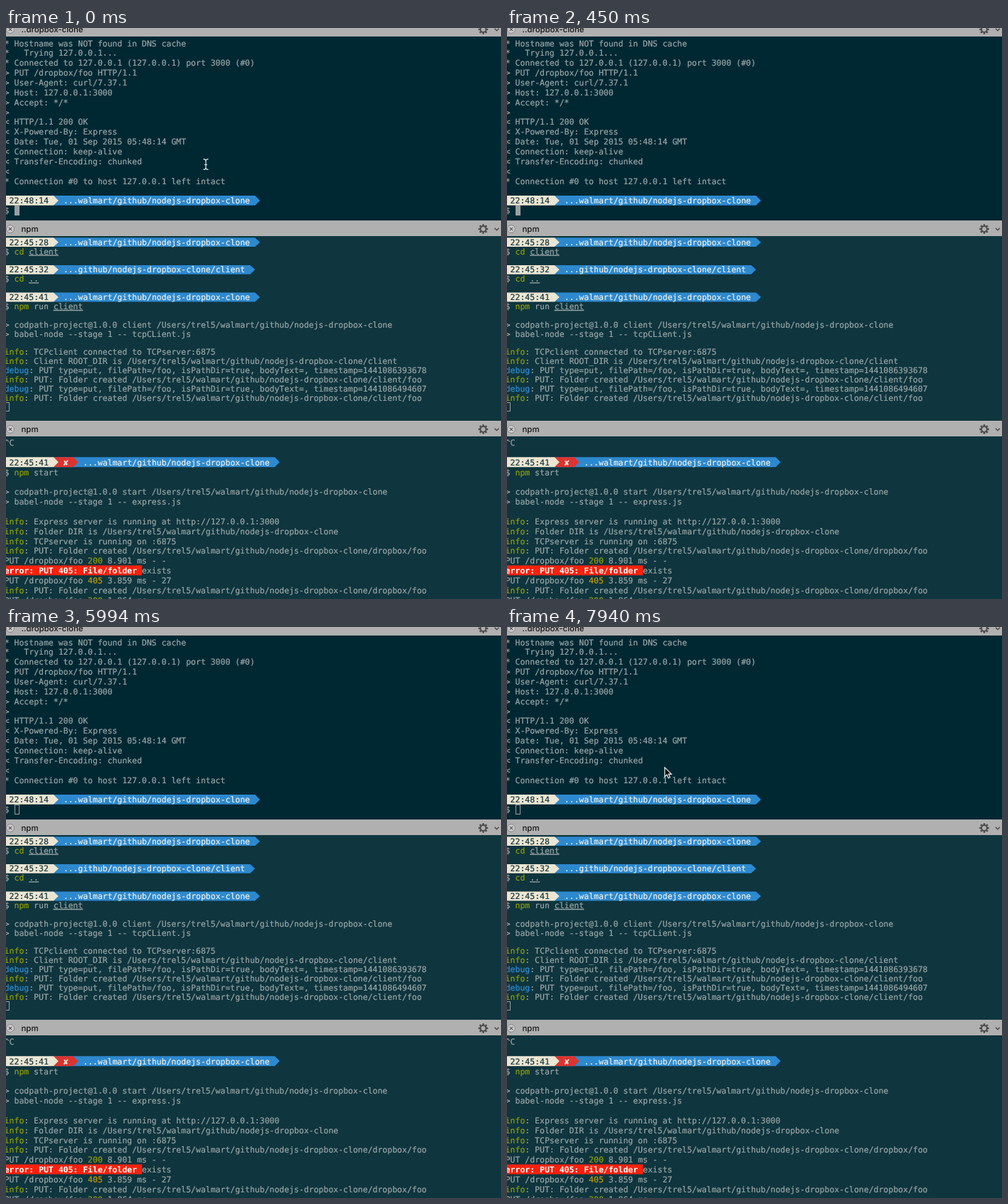
An HTML page for the animation above (8 s loop, 696 by 804 pixels).

```html
<!DOCTYPE html>
<html lang="en">
<head>
<meta charset="utf-8">
<title>Terminal panes</title>
<style>
html, body { margin: 0; width: 100%; height: 100%; overflow: hidden; background: #0f353e; }
svg { display: block; width: 696px; height: 804px; }
text { white-space: pre; text-rendering: geometricPrecision; }
.mono { font: 11.48px "DejaVu Sans Mono", monospace; color: #9aa6a6; }
.mono, .mono tspan { fill: currentColor; stroke: currentColor; stroke-width: 0.2; }
.title { font: 500 11.4px Inter, sans-serif; fill: #161616; }
.mono .g { color: #919f08; }
.mono .b { color: #2e8fd4; }
.mono .y { color: #c29d08; }
.mono .u { text-decoration: underline; }
.mono .e { color: #fff; font-weight: bold; stroke: none; }
.mono.time { color: #17343b; }
.mono.path { color: #eef0e6; }
</style>
</head>
<body>
<svg id="stage" viewBox="0 0 696 804"></svg>
<script>
const LOOP = 8000;
const COL = 6.911, LEFT = -2.3;
const ASCENT = 0.82; // share of a cell above the baseline
const GREY = '#95a1a1', CREAM = '#ebe6d3', BLUE = '#2d89cf', RED = '#dc3430';
const HOME = '/Users/trel5/walmart/github/nodejs-dropbox-clone';
const REPO = '...walmart/github/nodejs-dropbox-clone';
const stage = document.getElementById('stage');

const colX = n => LEFT + n * COL;
const escape = s => s.replace(/&/g, '&amp;').replace(/</g, '&lt;');
// {g:word} colours a word with class g
const markup = s => escape(s).replace(/\{(\w):([^}]*)\}/g, '<tspan class="$1">$2</tspan>');
const rect = (x, y, w, h, fill) => `<rect x="${x}" y="${y}" width="${w}" height="${h}" fill="${fill}"/>`;
const text = (col, y, s, cls = '') => `<text class="mono ${cls}" x="${colX(col)}" y="${y}">${markup(s)}</text>`;

// Bar that ends in an arrow head one column wide
function ribbon(from, to, top, h, fill) {
  const a = colX(from), b = colX(to), c = colX(to + 1);
  return `<path d="M${a} ${top}H${b}L${c} ${top + h / 2}L${b} ${top + h}H${a}Z" fill="${fill}"/>`;
}

function prompt(y, top, h, { time, path, failed }) {
  const start = failed ? 16 : 12, end = start + path.length + 1;
  return ribbon(10, end, top, h, BLUE)
    + (failed ? ribbon(10, 14, top, h, RED) + text(12, y, '✘', 'path') : '')
    + ribbon(0, 10, top, h, CREAM)
    + text(1, y, time, 'time') + text(start, y, path, 'path');
}

function rows(y0, pitch, lines) {
  return lines.map((line, i) => {
    const y = y0 + i * pitch, top = y - ASCENT * pitch;
    if (line.time) return prompt(y, top, pitch, line);
    const back = line.startsWith('{e:') ? rect(0, top, colX(28), pitch, '#f9210b') : '';
    return back + text(0, y, line);
  }).join('');
}

function gear(x, y) {
  let teeth = '';
  for (let a = 0; a < 360; a += 45) {
    teeth += `<rect x="-1.2" y="-6.8" width="2.4" height="3" transform="rotate(${a})"/>`;
  }
  return `<g transform="translate(${x} ${y})" fill="#4c4c4c">${teeth}
    <circle r="3.9" fill="none" stroke="#4c4c4c" stroke-width="2"/></g>`;
}

function titleBar(mid, title) {
  return rect(0, mid - 12, 696, 22, '#b0b0b0')
    + `<circle cx="6" cy="${mid}" r="5.4" fill="#cecece" stroke="#858585"/>
    <path d="M3.8 ${mid - 2.2}l4.4 4.4m0-4.4l-4.4 4.4" stroke="#555" stroke-width="1.2"/>
    <text class="title" x="21.5" y="${mid + 4}">${title}</text>`
    + gear(671, mid)
    + `<path d="M687 ${mid - 1.2}l3 3l3-3" fill="none" stroke="#4c4c4c" stroke-width="1.5"/>`;
}

const topPane = rows(25.6, 13.86, [
  '* Hostname was NOT found in DNS cache',
  '*   Trying 127.0.0.1...',
  '* Connected to 127.0.0.1 (127.0.0.1) port 3000 (#0)',
  '> PUT /dropbox/foo HTTP/1.1',
  '> User-Agent: curl/7.37.1',
  '> Host: 127.0.0.1:3000',
  '> Accept: */*',
  '>',
  '< HTTP/1.1 200 OK',
  '< X-Powered-By: Express',
  '< Date: Tue, 01 Sep 2015 05:48:14 GMT',
  '< Connection: keep-alive',
  '< Transfer-Encoding: chunked',
  '<',
  '* Connection #0 to host 127.0.0.1 left intact',
  '',
  { time: '22:48:14', path: REPO },
  '$'
]);

const put = '{b:debug}: PUT type=put, filePath=/foo, isPathDir=true, bodyText=, timestamp=';
const made = '{g:info}: PUT: Folder created ' + HOME;

const clientPane = rows(305.8, 12.88, [
  { time: '22:45:28', path: REPO },
  '$ {g:cd} {u:client}',
  '',
  { time: '22:45:32', path: '...github/nodejs-dropbox-clone/client' },
  '$ {g:cd} {u:..}',
  '',
  { time: '22:45:41', path: REPO },
  '$ {g:npm} run {u:client}',
  '',
  '> codpath-project@1.0.0 client ' + HOME,
  '> babel-node --stage 1 -- tcpCLient.js',
  '',
  '{g:info}: TCPclient connected to TCPserver:6875',
  `{g:info}: Client ROOT_DIR is ${HOME}/client`,
  put + '1441086393678',
  made + '/client/foo',
  put + '1441086494607',
  made + '/client/foo'
]);

const serverPane = rows(588, 13.85, [
  '^C',
  '',
  { time: '22:45:41', path: REPO, failed: true },
  '$ {g:npm} start',
  '',
  '> codpath-project@1.0.0 start ' + HOME,
  '> babel-node --stage 1 -- express.js',
  '',
  '{g:info}: Express server is running at http://127.0.0.1:3000',
  '{g:info}: Folder DIR is ' + HOME,
  '{g:info}: TCPserver is running on :6875',
  made + '/dropbox/foo',
  'PUT /dropbox/foo {g:200} 8.901 ms - -',
  '{e:error: PUT 405: File/folder }exists',
  'PUT /dropbox/foo {y:405} 3.859 ms - 27',
  made + '/dropbox/foo',
  'PUT /dropbox/foo {g:200} 1.864 ms - -'
]);

stage.innerHTML = rect(0, 0, 696, 804, '#0f353e') + rect(0, 0, 696, 272, '#002833')
  + topPane + clientPane + serverPane
  + titleBar(2, '..dropbox-clone') + titleBar(283, 'npm') + titleBar(565, 'npm')
  + `<rect x="-2" y="527.5" width="6.5" height="12" fill="none" stroke="${GREY}"/>
  <rect id="caret" x="12.5" y="250.5" width="6" height="13" stroke="${GREY}"/>
  <path id="beam" d="M277.5 184.7q3.5 0 3.5 2.3v10q0 2.3-3.5 2.3M284.5 184.7q-3.5 0-3.5 2.3v10q0 2.3 3.5 2.3M279 192.5h4"
    fill="none" stroke="#e6ebeb" stroke-width="1.2"/>
  <path id="arrow" d="M.8 .8v13l3-2.8l2.2 4.7l2.2-1l-2.1-4.6h4.2Z" fill="#080808" stroke="#fff" stroke-width="1.1"/>`;

const [caret, beam, arrow] = ['caret', 'beam', 'arrow'].map(id => document.getElementById(id));
const show = (el, on) => el.setAttribute('visibility', on ? 'visible' : 'hidden');

function draw(t) {
  show(beam, t < 450);
  caret.setAttribute('fill', t < 3300 ? GREY : 'none');
  show(arrow, t >= 7790);
  arrow.setAttribute('transform', t < 7940 ? 'translate(327 26)' : 'translate(221 197)');
}

const begin = performance.now();
function tick() {
  draw((performance.now() - begin) % LOOP);
  requestAnimationFrame(tick);
}
tick();
</script>
</body>
</html>
```
